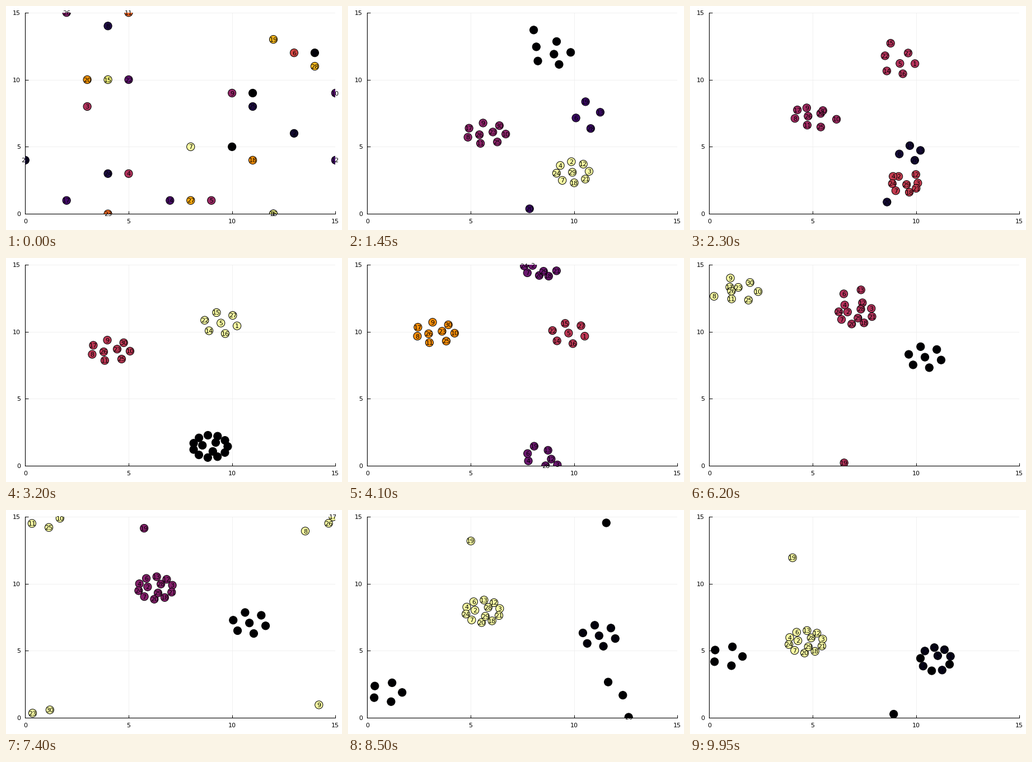
Write a matplotlib script that moves like this. It is 600 px wide and 400 px high and loops after 10000 ms.

```python
import matplotlib.pyplot as plt
import numpy as np
from matplotlib.animation import FuncAnimation

FRAMES, INTERVAL = 200, 50
SIZE = 15                     # side of the wrapping world
PX = 72 / 100                 # points per pixel at 100 dpi

# Initial state of birds 1 to 30: x, y, shade in percent
START = np.array([
    (12, 0, 90), (13, 6, 8), (3, 8, 47), (5, 3, 47), (9, 1, 42),
    (13, 12, 57), (8, 5, 100), (4, 14, 12), (10, 9, 40), (15, 9, 25),
    (5, 15, 66), (15, 4, 20), (14, 12, 2), (7, 1, 22), (4, 10, 96),
    (12, 0, 97), (2, 1, 20), (11, 4, 76), (12, 13, 84), (3, 10, 77),
    (0, 4, 8), (5, 10, 27), (4, 0, 67), (4, 3, 12), (11, 8, 12),
    (2, 15, 36), (8, 1, 81), (14, 11, 84), (10, 5, 0), (11, 9, 0)], float)
PLACES = START[:, :2]


def ring(ids, x, y, start, rx, ry=None):
    """Spread birds evenly and clockwise over an ellipse."""
    angles = np.radians(start - 360 / len(ids) * np.arange(len(ids)))
    xs = x + rx * np.cos(angles)
    ys = y + (ry or rx) * np.sin(angles)
    return dict(zip(ids, zip(xs, ys)))


def left(x, y):
    return (ring([9, 30, 10, 25, 11, 8, 17], x, y, 99, .95, .78)
            | ring([23, 26], x, y, 17, .34))


def pentagon(x, y):
    return ring([23, 30, 10, 25, 11], x, y, 142, .74)


def right(x, y):
    return {5: (x, y)} | ring([15, 27, 1, 16, 14, 22], x, y, 105, .81)


def main(x, y, start, newcomers=()):
    outer = [*newcomers, 12, 3, 21, 18, 20, 7, 24, 4]
    if 13 in newcomers:
        outer.append(6)
    return ring(outer, x, y, start, .84) | ring([2, 28, 29], x, y, 168, .39)


# Frame of each key pose, and the pose as bird: place
KEYS = {
    # small groups form
    29: left(5.75, 6.0)
        | {29: (9.92, 3.1)}
        | ring([2, 12, 3, 21, 18, 7, 24, 4], 9.94, 3.1, 95, .79)
        | ring([19, 13, 28, 6], 10.68, 7.36, 102, .6, 1.02)
        | {5: (9.03, 11.9), 15: (8.05, 13.7), 20: (7.85, .38)}
        | ring([27, 1, 16, 14, 22], 8.94, 11.97, 76, .9),
    # three tight flocks
    64: left(4.12, 8.6) | main(8.95, 1.45, 98, [19, 13])
        | right(9.46, 10.64),
    # the main flock crosses the edge and three birds fall behind
    100: left(2.46, 11.28) | main(7.83, 13.2, 72) | right(10.03, 9.12)
         | {6: (7.18, .02), 13: (8.27, .41), 19: (7.36, 1.2)},
    # the left flock breaks up at the corner
    148: pentagon(.94, 14.9) | main(6.3, 9.68, 86, [13])
         | right(10.84, 7.07)
         | {8: (13.54, 13.92), 9: (14.2, .97), 17: (14.88, 14.98),
            26: (14.67, 14.5), 19: (5.75, 14.13)},
    170: pentagon(.95, 1.92) | main(5.59, 7.94, 86, [13])
         | right(11.21, 6.12)
         | {8: (11.56, 14.53), 9: (11.65, 2.67), 17: (12.36, 1.69),
            26: (12.64, .05), 19: (5.01, 13.18)},
    # stray birds join the right flock
    199: pentagon(.87, 4.6) | main(4.67, 5.67, 86, [13])
         | {5: (11.05, 4.63), 8: (8.92, .28), 19: (4.03, 11.93)}
         | ring([15, 27, 1, 9, 16, 26, 14, 17, 22],
                10.95, 4.36, 95, .74, .88),
}

# Shade per key pose: left flock, main flock, right flock, late joiners
SHADES = [(.38, 1, 0, .18), (.5, 0, 1, 0), (1, .6, 0, .6),
          (1, .36, 0, .36), (0, 1, .03, 1), (0, 1, .05, 1)]

flock = np.ones(len(START), int)
for group, ids in ((0, left(0, 0)), (2, right(0, 0)), (3, (6, 13, 19, 20, 28))):
    flock[np.array(list(ids)) - 1] = group

knots = np.array([0, *KEYS])
shades = [START[:, 2] / 100] + [np.array(s)[flock] for s in SHADES]

# Unwrapped poses: each bird takes the shortest way to its next place
poses = [PLACES]
for pose in KEYS.values():
    goal = np.array([pose[bird] for bird in sorted(pose)])
    poses.append(goal + SIZE * np.round((poses[-1] - goal) / SIZE))

spans = np.diff(knots)
slopes = [(b - a) / h for a, b, h in zip(poses, poses[1:], spans)]
KEEP = [.2, .45, .75, .4, .5]          # share of the incoming velocity
speeds = [slopes[0] * 1.3]
speeds += [w * a + (1 - w) * b for w, a, b in zip(KEEP, slopes, slopes[1:])]
speeds.append(slopes[-1])


def state(n):
    """Positions and shades of all birds at frame n."""
    k = min(np.searchsorted(knots, n, side="right") - 1, len(spans) - 1)
    h = spans[k]
    t = (n - knots[k]) / h
    ease = t * t * (3 - 2 * t)
    pos = (poses[k] * (1 - ease) + poses[k + 1] * ease
           + h * t * (1 - t) * ((1 - t) * speeds[k] - t * speeds[k + 1]))
    shade = shades[k] * (1 - ease) + shades[k + 1] * ease
    return (PLACES if n == 0 else pos % SIZE), shade


plt.rcParams["font.family"] = "DejaVu Sans"
fig = plt.figure(figsize=(6, 4), dpi=100, facecolor="white")
ax = fig.add_axes([34.3 / 600, 28.8 / 400, 554 / 600, 359.5 / 400])
ax.set(xlim=(0, SIZE), ylim=(0, SIZE),
       xticks=range(0, 16, 5), yticks=range(0, 16, 5))
ax.set_axisbelow(True)
ax.grid(color="#ebebeb", linewidth=.7 * PX)
ax.tick_params(direction="in", length=5.5 * PX, width=PX, labelsize=8)
ax.tick_params(axis="x", pad=8.3 * PX)
ax.tick_params(axis="y", pad=8.3 * PX)
for side in ("left", "bottom"):
    ax.spines[side].set_linewidth(1.1 * PX)
for side in ("top", "right"):
    ax.spines[side].set_visible(False)

birds = ax.scatter(*PLACES.T, s=(14.2 * PX) ** 2, edgecolors="black",
                   linewidths=PX, zorder=3)
labels = [ax.text(x, y, str(i + 1), fontsize=8, ha="center",
                  va="center_baseline", zorder=4)
          for i, (x, y) in enumerate(PLACES)]


def draw(n):
    pos, shade = state(n)
    birds.set_offsets(pos)
    birds.set_facecolors(plt.cm.inferno(shade))
    for label, p in zip(labels, pos):
        label.set_position(p)
    return [birds, *labels]


anim = FuncAnimation(fig, draw, frames=FRAMES, interval=INTERVAL,
                     repeat=True, repeat_delay=0)
plt.show()
```
